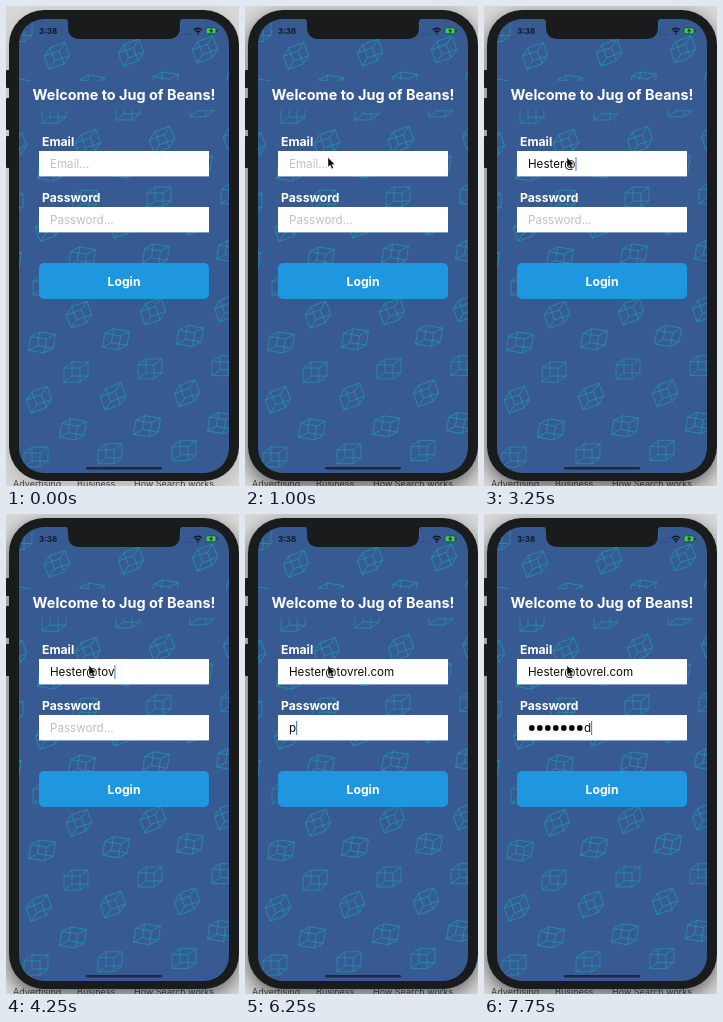
These frames come from a looping animation (233x480 px, 8 s). An HTML page:

```html
<!DOCTYPE html>
<html lang="en">
<head>
<meta charset="utf-8">
<title>Login screen</title>
<style>
  html, body { margin: 0; width: 100%; height: 100%; overflow: hidden; background: #d8d8d8; }
  svg { display: block; width: 100%; height: 100%; font-family: Inter, sans-serif; }
  .bold { font-weight: 700; fill: #fff; font-size: 12.2px; }
  .entry { font-size: 11.6px; fill: #0a0a0a; }
  .hint { font-size: 11.6px; fill: #bfbfc2; }
  #cubes path { fill: none; stroke: #2199ac; stroke-width: .7; stroke-linejoin: round; }
  #shadow { animation: focus 8s step-end infinite; }
  @keyframes focus { 0% { opacity: .15 } 9.375%, 100% { opacity: .55 } }
</style>
</head>
<body>
<svg viewBox="0 0 233 480" preserveAspectRatio="none">
  <defs>
    <clipPath id="screen"><rect x="13" y="13" width="210" height="454" rx="25"/></clipPath>
    <filter id="blur" x="-20%" y="-20%" width="140%" height="140%"><feGaussianBlur stdDeviation="9"/></filter>
  </defs>

  <rect width="233" height="480" fill="#d8d8d8"/>
  <g font-size="9" fill="#444">
    <text x="7" y="481">Advertising</text>
    <text x="71" y="481">Business</text>
    <text x="128" y="481">How Search works</text>
  </g>
  <rect id="shadow" x="3" y="10" width="229" height="471" rx="34" filter="url(#blur)"/>

  <g fill="#1a1b1c">
    <rect y="64" width="5" height="18" rx="1"/>
    <rect y="92" width="5" height="32" rx="1"/>
    <rect y="130" width="5" height="32" rx="1"/>
    <rect x="3" y="4" width="230" height="471" rx="35"/>
  </g>

  <g clip-path="url(#screen)">
    <rect x="13" y="13" width="210" height="454" fill="#375a93"/>
    <g id="cubes"></g>
    <rect x="13" y="75" width="210" height="29" fill="#375a93"/>
    <path d="M57 12q5 0 5 5v4q0 12 12 12h88q12 0 12-12v-4q0-5 5-5z" fill="#1a1b1c"/>
  </g>

  <text x="33" y="28" font-size="8" font-weight="700" fill="#101724">3:38</text>
  <g fill="none" stroke="#101724" stroke-width="1.3">
    <path d="M187.8 24q4-3.6 8 0M189.5 26q2.3-2 4.6 0"/>
    <circle cx="191.8" cy="27.6" r=".4"/>
    <path d="M176 28.2h8" stroke-width=".9" stroke-dasharray="1 1.2" opacity=".5"/>
  </g>
  <rect x="200" y="21.8" width="10" height="6" rx="1.6" fill="#43c463" stroke="#173c35" stroke-width=".7"/>
  <path d="M211.2 23.6v2.4" stroke="#173c35"/>
  <path d="M205.8 21.6l-2.6 3.6h1.8l-.6 2.8 2.7-3.7h-1.9z" fill="#14241f"/>

  <text class="bold" x="118" y="93.5" text-anchor="middle" style="font-size:14.4px">Welcome to Jug of Beans!</text>
  <text class="bold" x="36" y="139.5">Email</text>
  <text class="bold" x="36" y="195.5">Password</text>
  <g fill="#fff">
    <rect x="33" y="145" width="170" height="25.4"/>
    <rect x="33" y="201" width="170" height="25.4"/>
  </g>
  <text id="emailHint" class="hint" x="44" y="162">Email...</text>
  <text id="passHint" class="hint" x="44" y="218">Password...</text>
  <text id="email" class="entry" x="44" y="162"></text>
  <g id="dots" fill="#0a0a0a"></g>
  <text id="letter" class="entry" y="218"></text>
  <rect id="caret" width="1" height="14" fill="#3f78d8"/>

  <rect x="33" y="257" width="170" height="36" rx="5" fill="#1f96e0"/>
  <text class="bold" x="118" y="279.5" text-anchor="middle">Login</text>
  <rect x="80" y="461" width="76" height="2.4" rx="1.2" fill="#20273c"/>
  <path id="pointer" d="M0 0v9.6l2.2-2 1.6 3.6 1.7-.8-1.6-3.4h3z" fill="#080808" stroke="#fff" stroke-width=".4"/>
</svg>
<script>
const $ = id => document.getElementById(id);
const svgNode = (tag, attrs, parent) => {
  const node = document.createElementNS('http://www.w3.org/2000/svg', tag);
  for (const key in attrs) node.setAttribute(key, attrs[key]);
  return parent.appendChild(node);
};
const show = (node, on) => node.setAttribute('visibility', on ? 'visible' : 'hidden');

// Staggered, slightly tilted lattice; each column cycles through three poses.
const poses = [0, -20, 9];
for (let col = -1; col < 6; col++) {
  for (let row = 0; row < 9; row++) {
    const odd = Math.abs(col % 2);
    const x = 30 + 37 * col + 3 * row;
    const y = 451 - 1.6 * col - 57.3 * row - 26 * odd;
    svgNode('path', {
      d: 'M-12-4H4V10H-12ZM-4-10H12V4H-4ZM-12-4L-4-10M4-4L12-10M4 10L12 4M-12 10L-4 4',
      transform: `translate(${x} ${y}) rotate(${poses[(row + 2 * odd) % 3]})`
    }, $('cubes'));
  }
}

// Linear interpolation through [time, value] points; zero before the first.
function along(points, t) {
  if (t < points[0][0]) return 0;
  const next = points.findIndex(([time]) => time > t);
  if (next < 0) return points[points.length - 1][1];
  const [t0, v0] = points[next - 1], [t1, v1] = points[next];
  return v0 + (v1 - v0) * (t - t0) / (t1 - t0);
}

const EMAIL = 'Hester@tovrel.com', SECRET = 'password';
const emailPace = [[1750, 1], [2250, 3], [2750, 4], [3250, 7], [3750, 8], [4750, 13], [5500, 17]];
const secretPace = [[6250, 1], [7750, 8]];
const dots = [...SECRET.slice(1)].map((_, i) =>
  svgNode('circle', { cx: 47.8 + 8 * i, cy: 214, r: 2.9 }, $('dots')));

function draw(t) {
  const typed = Math.floor(along(emailPace, t)), hidden = Math.floor(along(secretPace, t));
  const email = $('email'), letter = $('letter'), inPassword = t >= 5750;
  email.textContent = EMAIL.slice(0, typed);
  show($('emailHint'), !typed);
  show($('passHint'), !hidden);
  dots.forEach((dot, i) => show(dot, i < hidden - 1));

  const letterX = 44 + 8 * Math.max(0, hidden - 1);
  letter.textContent = hidden ? SECRET[hidden - 1] : '';
  letter.setAttribute('x', letterX);

  const [active, left] = inPassword ? [letter, letterX] : [email, 44];
  const width = active.textContent ? active.getComputedTextLength() : 0;
  $('caret').setAttribute('x', left + width);
  $('caret').setAttribute('y', inPassword ? 207 : 151);
  show($('caret'), t >= 1250);

  const remaining = (1 - Math.min(1, Math.max(0, (t - 500) / 500))) ** 2;
  $('pointer').setAttribute('transform', `translate(${83 + 30 * remaining} ${151.5 + 50 * remaining})`);
  show($('pointer'), t >= 500);
}

const STEP = 250, LOOP = 8000, start = performance.now();
(function tick() {
  const t = (performance.now() - start) % LOOP;
  draw(Math.floor(t / STEP) * STEP);
  requestAnimationFrame(tick);
})();
</script>
</body>
</html>
```
